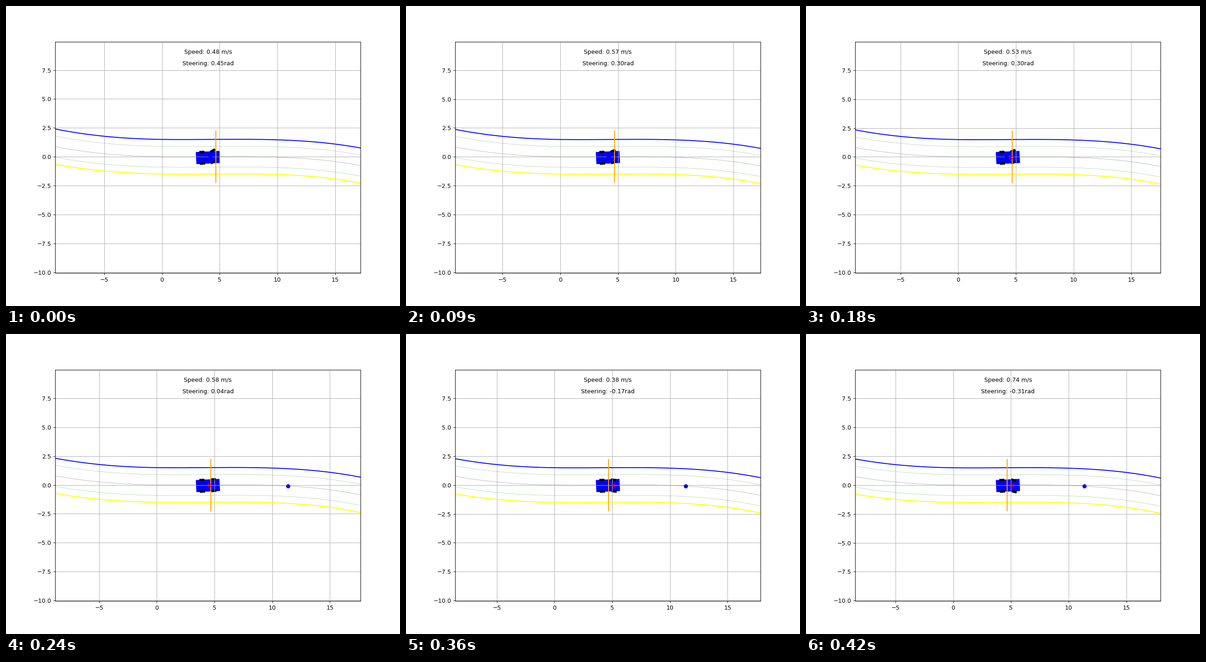
Animation of 858 by 653 pixels, one loop 0.45 s. Source, as a matplotlib script:

```python
import numpy as np
import matplotlib.pyplot as plt
from matplotlib.animation import FuncAnimation
from matplotlib.patches import Rectangle
from matplotlib.transforms import Affine2D

WIDTH, HEIGHT, DPI = 858, 653, 92
FRAMES, INTERVAL = 15, 30
PX_PER_M = 25.14
HEADING = 0.05
BODY_L, BODY_W = 2.0, 1.0
WHEEL_L, WHEEL_W = 0.4, 0.15

# Vehicle state at key steps
STEPS = [0, 3, 6, 8, 10, 12, 14]
CAR_X = [3.98, 4.133, 4.31, 4.435, 4.54, 4.63, 4.74]
SPEED = [0.48, 0.57, 0.53, 0.58, 0.52, 0.38, 0.74]
STEER = [0.45, 0.30, 0.30, 0.04, 0.32, -0.17, -0.31]


def road(x):
    """Lateral position of the road centre."""
    u = np.maximum(-x, 0)
    left = 0.0138 * u + 0.0068 * u**2 + 0.00021 * u**3
    right = -0.00039 * x * (x - 4.2) * (x - 8.4)
    return np.where(x < 0, left, right)


def lane(offset):
    """Road centre shifted sideways along its normal."""
    x = np.linspace(-13, 22, 500)
    y = road(x)
    slope = np.gradient(y, x)
    norm = np.hypot(1, slope)
    return x - offset * slope / norm, y + offset / norm


# The tiny margin keeps rounding from dropping a pixel
fig, ax = plt.subplots(figsize=((WIDTH + 1e-6) / DPI, (HEIGHT + 1e-6) / DPI),
                       dpi=DPI)
ax.grid(True)

for offset, color, width in [(1.5, "blue", 1.5), (-1.5, "yellow", 1.5),
                             (0.9, "green", 0.2), (-0.9, "green", 0.2),
                             (0, "black", 0.2)]:
    ax.plot(*lane(offset), color=color, lw=width)

ax.plot([4.685, 4.685], [-2.23, 2.23], color="orange", lw=1.5)
target, = ax.plot([], [], "bo", ms=6)
cross, = ax.plot([], [], "rx", ms=6)


def box(x, y, w, h, color):
    return ax.add_patch(Rectangle((x, y), w, h, color=color, lw=1))


def axle(x):
    return [box(x - WHEEL_L / 2, side - WHEEL_W / 2, WHEEL_L, WHEEL_W, "black")
            for side in (-0.5, 0.5)]


body = box(-BODY_L / 2, -BODY_W / 2, BODY_L, BODY_W, "blue")
rear, front = axle(-0.5), axle(0.5)

speed_text = ax.text(0.5, 0.95, "", ha="center", transform=ax.transAxes)
steer_text = ax.text(0.5, 0.90, "", ha="center", transform=ax.transAxes)

area = ax.get_position()
HALF_X = area.width * WIDTH / PX_PER_M / 2
HALF_Y = area.height * HEIGHT / PX_PER_M / 2


def update(i):
    x, speed, steer = (np.interp(i, STEPS, v) for v in (CAR_X, SPEED, STEER))
    y = -0.066 + 0.041 * (x - CAR_X[0])
    ax.set_xlim(x - HALF_X, x + HALF_X)
    ax.set_ylim(y - HALF_Y, y + HALF_Y)

    pose = Affine2D().rotate(HEADING).translate(x, y) + ax.transData
    for part in [body, *rear, *front]:
        part.set_transform(pose)
    for wheel in front:
        wheel.set_angle(np.degrees(steer))

    goal = 4.2 if i < 7 else 11.37
    target.set_data([goal], [float(road(goal))])
    cross.set_data([4.56 if i < 11 else 5.07], [-0.02])
    cross.set_visible(i >= 5)

    speed_text.set_text(f"Speed: {speed:.2f} m/s")
    steer_text.set_text(f"Steering: {steer:.2f}rad")
    return []


anim = FuncAnimation(fig, update, frames=FRAMES, interval=INTERVAL,
                     repeat=True, repeat_delay=0, blit=False)
plt.show()
```
